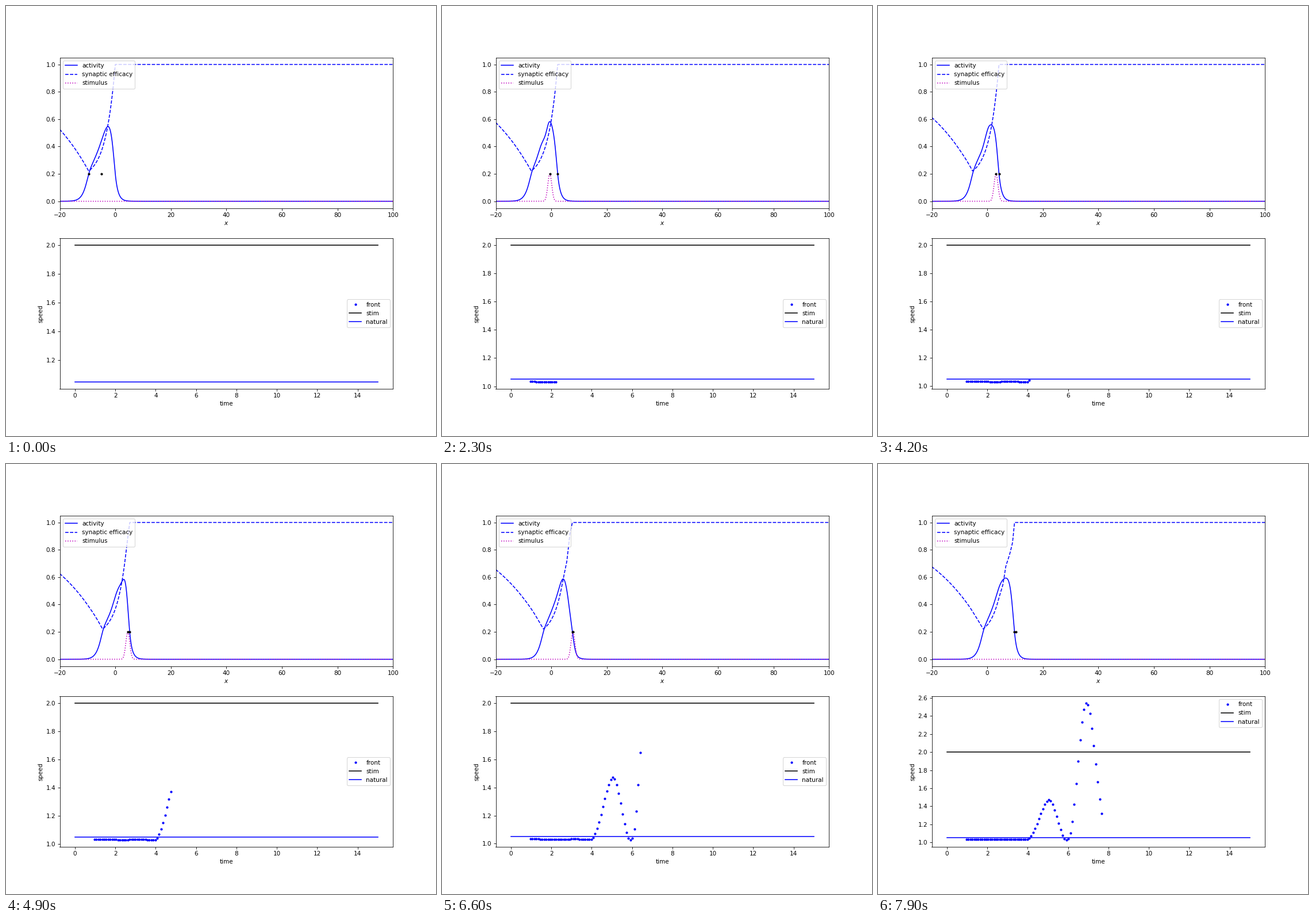
These frames come from a looping animation (748 px wide and 748 px high, 8 s). A matplotlib script:

```python
import numpy as np
import matplotlib.pyplot as plt
from matplotlib.animation import FuncAnimation

# Neural field with synaptic depression, driven by a flashing moving stimulus
THETA, BETA, TAU_Q = 0.2, 5.0, 20.0
C_NAT, C_STIM, X_STIM = 1.051, 2.0, -5.0
WIDTH = 9.58
FRAMES, DT, SUB = 80, 0.097, 10
FIT = 10

N, LEFT, LENGTH = 6000, -100.0, 300.0
dx = LENGTH / N
x = LEFT + dx * np.arange(N)
k = 2 * np.pi * np.fft.rfftfreq(N, dx)


def spectral(f, factor):
    return np.fft.irfft(np.fft.rfft(f) * factor, N)


def soft_step(d):
    """Step one grid cell wide, so edges move smoothly between cells."""
    return np.clip(d / dx + 0.5, 0, 1)


def stimulus(t):
    if t <= 0 or t % 2 >= 1:
        return np.zeros(N)
    return 0.2 * np.exp(-(x - X_STIM - C_STIM * t) ** 2)


def rates(u, q, drive):
    fire = soft_step((u - THETA) / THETA)
    du = -u + spectral(q * fire, 1 / (1 + k ** 2)) + drive
    dq = (1 - q - BETA * q * fire) / TAU_Q
    return du, dq


def pulse():
    """Travelling pulse with its front at x = 0."""
    g = 1 / (1 + BETA)
    rate = (1 + BETA) / (C_NAT * TAU_Q)
    inside = g + (1 - g) * np.exp(rate * np.clip(x, -WIDTH, 0))
    low = g + (1 - g) * np.exp(-rate * WIDTH)
    behind = 1 - (1 - low) * np.exp(np.minimum(x + WIDTH, 0) / (C_NAT * TAU_Q))
    q = np.where(x < -WIDTH, behind, inside)
    active = soft_step(x + WIDTH) * soft_step(-x)
    u = spectral(q * active, 1 / ((1 + k ** 2) * (1 - 1j * k * C_NAT)))
    return u, q


def front_of(u):
    i = np.nonzero(u > THETA)[0][-1]
    return x[i] + dx * (u[i] - THETA) / (u[i] - u[i + 1])


def simulate():
    u, q = pulse()
    states = [(u, q)]
    h = DT / SUB
    for step in range((FRAMES - 1) * SUB):
        drive = stimulus((step + 0.5) * h)
        du, dq = rates(u, q, drive)
        du2, dq2 = rates(u + h * du, q + h * dq, drive)
        u = u + h * (du + du2) / 2
        q = q + h * (dq + dq2) / 2
        if (step + 1) % SUB == 0:
            states.append((u, q))
    return states


states = simulate()
times = DT * np.arange(FRAMES)
fronts = np.array([front_of(u) for u, _ in states])
speeds = np.array([np.polyfit(times[n - FIT + 1:n + 1], fronts[n - FIT + 1:n + 1], 1)[0]
                   for n in range(FIT, FRAMES)])

fig, (top, low) = plt.subplots(2, 1, figsize=(10, 10), dpi=74.8)

u_line, = top.plot([], [], "b-", label="activity")
q_line, = top.plot([], [], "b--", label="synaptic efficacy")
s_line, = top.plot([], [], "m:", label="stimulus")
marks, = top.plot([], [], "k.")
top.set_xlim(-20, 100)
top.set_ylim(-0.05, 1.05)
top.set_xlabel("$x$")
top.legend(loc="upper left")

dots, = low.plot([], [], "b.", label="front")
low.plot([0, 15], [C_STIM, C_STIM], "k-", label="stim")
low.plot([0, 15], [C_NAT, C_NAT], "b-", label="natural")
low.set_xlabel("time")
low.set_ylabel("speed")
low.legend(loc="best")


def update(n):
    u, q = states[n]
    t = times[n]
    u_line.set_data(x, u)
    q_line.set_data(x, q)
    s_line.set_data(x, stimulus(t))
    edge = fronts[n] if n else -WIDTH
    marks.set_data([edge, X_STIM + C_STIM * t], [THETA, THETA])
    count = max(0, n - FIT + 1)
    dots.set_data(times[FIT:FIT + count], speeds[:count])
    low.relim()
    low.autoscale_view()
    return u_line, q_line, s_line, marks, dots


anim = FuncAnimation(fig, update, frames=FRAMES, interval=100,
                     init_func=lambda: update(0), repeat=True, repeat_delay=0)
plt.show()
```
